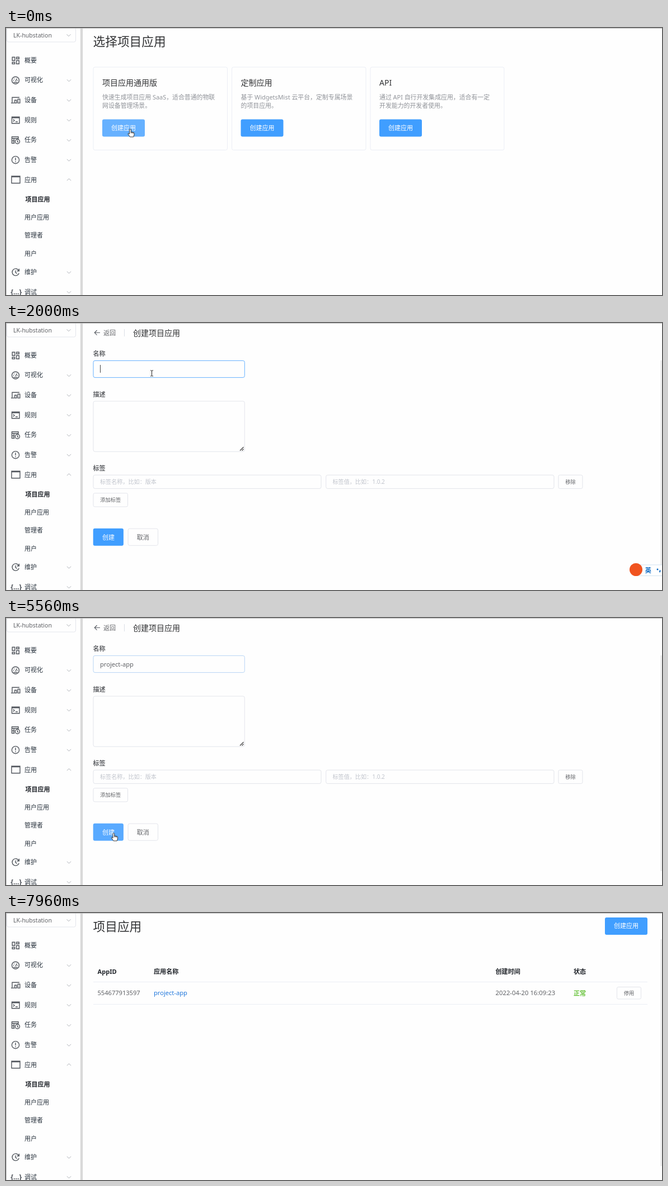
Write an HTML page that moves like this. It is 1172 px wide and 478 px high and loops after 8.11 s.

```html
<!DOCTYPE html>
<html lang="zh-CN">
<head>
<meta charset="utf-8">
<title>项目应用</title>
<style>
  html, body { margin: 0; width: 100%; height: 100%; overflow: hidden; background: #fefefe; }
  svg { display: block; width: 100%; height: 100%; }
  text { font: 11.1px "Noto Sans", "Noto Sans CJK SC", "Noto Sans CJK", sans-serif; fill: #606266; white-space: pre; }
  .h1 { font-size: 21.7px; fill: #303133; }
  .h2 { font-size: 14px; fill: #303133; }
  .menu text { font-size: 11px; fill: #28323d; }
  .bold, .menu .bold { font-weight: 700; }
  .dark, .menu .dark { fill: #1f2329; }
  .note { font-size: 10.9px; fill: #909399; }
  .hint { font-size: 10.1px; fill: #c0c4cc; }
  .small { font-size: 9.3px; text-anchor: middle; }
  .mid { font-size: 11px; text-anchor: middle; }
  .white { fill: #fff; }
  .card { fill: #fefefe; stroke: #ebeef5; }
  .field { fill: #fefefe; stroke: #dcdfe6; stroke-width: .8; }
  .primary { fill: #409eff; }
  .icons { fill: none; stroke: #50555c; stroke-width: 1.4; }
  .chevrons { fill: none; stroke: #a3a7ae; stroke-width: .9; }
  .rule { stroke: #ebeef5; }
</style>
</head>
<body>
<svg viewBox="0 0 1172 478">
  <defs>
    <path id="down" d="M-3.5-1.7 0 1.8 3.5-1.7"/>
    <g id="hand"><path d="M-1.5 8V.8Q-.1-1 1.2.8V5L5.8 6Q7 6.3 7 7.5V10L5.8 14H-.5L-4 8.8Q-4 7-2.6 7.8L-1.5 9ZM1.2 5V7.5M3.2 5.5V7.5M5.2 6V8" fill="#fff" stroke="#222" stroke-width=".9"/></g>
    <g id="arrow"><path d="M0 0V11L2.6 8.6 4.2 12.2 5.8 11.5 4.2 8H7.4Z" fill="#fff" stroke="#222" stroke-width=".9"/></g>
    <g id="beam"><path d="M-2.5-5H-.6L0-4.5.6-5H2.5M0-4.5V4.5M-2.5 5H-.6L0 4.5.6 5H2.5" fill="none" stroke="#222"/></g>
  </defs>

  <rect width="1172" height="478" fill="#fefefe"/>

  <g class="menu">
    <rect class="field" x="1.5" y="-3" width="123" height="28" rx="3"/>
    <text x="13" y="17" style="font-size:10.5px;fill:#606266">LK-hubstation</text>
    <text x="33" y="62.2">概要</text>
    <text x="33" y="97.4">可视化</text>
    <text x="33" y="133.2">设备</text>
    <text x="33" y="168.8">规则</text>
    <text x="33" y="204.4">任务</text>
    <text x="33" y="240.2">告警</text>
    <text x="33" y="275.8">应用</text>
    <text x="34.5" y="310.7" class="bold dark">项目应用</text>
    <text x="33" y="343.2">用户应用</text>
    <text x="33" y="375.4">管理者</text>
    <text x="33" y="408.2">用户</text>
    <text x="33" y="441.2">维护</text>
    <text x="33" y="477.2">调试</text>
    <text x="8.2" y="476.7" class="bold" style="font-size:12.2px;fill:#50555c">{...}</text>
  </g>
  <g class="icons">
    <path d="M11.2 52.2h4.6v6h-4.6zM18.7 52.2h4.6v3h-4.6zM11.2 61.2h4.6v3h-4.6zM18.7 58.2h4.6v6h-4.6z"/>
    <circle cx="17" cy="93.7" r="6.5"/>
    <path d="M17 95.5 19.5 90.5M13 94h1.2M14.3 90.8l.8.8M20 94h1.2M13.5 97.5h7"/>
    <path d="M24 124.2H11V133M9 134.3h5.5M15.6 129.2h3.2v5.2h-3.2zM21.2 127.2h3.6v7.2h-3.6z"/>
    <path d="M10.5 159.2h13.5v11.6H10.5zM10.5 160.7H24M12.8 163.5l2.3 2-2.3 2M17 168h4"/>
    <path d="M15.5 206.2h-5v-11.4h11.5v4M10.5 197.8H22M14.2 198v8M10.5 202h5"/>
    <circle cx="20.5" cy="203.3" r="4"/>
    <path d="M20.5 201v2.7l1.7 1"/>
    <circle cx="17" cy="236.2" r="6.6"/>
    <path d="M17 232.3v4.8M17 238.5v1.7"/>
    <path d="M10 265.2h15v12.6H10zM10 266.6h15"/>
    <path d="M22.8 434.3A6.2 6.2 0 1 0 23.2 439M23.4 431v4h-4M17 434v3.8l2.8 1.6"/>
  </g>
  <g class="chevrons" id="chevrons">
    <use href="#down" x="112" y="13"/>
    <use href="#down" transform="translate(112.5 271.5) scale(1 -1)"/>
  </g>
  <rect x="132.8" width="4.4" height="478" fill="#d9d9d9"/>

  <g id="pick">
    <text class="h1" x="155.5" y="32">选择项目应用</text>
    <rect class="card" x="156" y="70" width="239.5" height="148.5" rx="3"/>
    <rect class="card" x="403.5" y="70" width="239.5" height="148.5" rx="3"/>
    <rect class="card" x="651" y="70" width="239" height="148.5" rx="3"/>
    <text class="h2" x="172" y="103">项目应用通用版</text>
    <text class="h2" x="419.5" y="103">定制应用</text>
    <text class="h2" x="667" y="103">API</text>
    <text class="note" x="172" y="128.4">快速生成项目应用 SaaS，适合普通的物联</text>
    <text class="note" x="172" y="142.8">网设备管理场景。</text>
    <text class="note" x="419.5" y="128.4">基于 WidgetsMist 云平台，定制专属场景</text>
    <text class="note" x="419.5" y="142.8">的项目应用。</text>
    <text class="note" x="667" y="128.4">通过 API 自行开发集成应用，适合有一定</text>
    <text class="note" x="667" y="142.8">开发能力的开发者使用。</text>
    <rect class="primary" id="pickButton" x="172" y="163.5" width="76" height="31" rx="3"/>
    <rect class="primary" x="419.5" y="163.5" width="76" height="31" rx="3"/>
    <rect class="primary" x="667" y="163.5" width="76" height="31" rx="3"/>
    <text class="mid white" x="210" y="183.3">创建应用</text>
    <text class="mid white" x="457.5" y="183.3">创建应用</text>
    <text class="mid white" x="705" y="183.3">创建应用</text>
  </g>

  <g id="form">
    <path d="M168 17.3H158.5M162.5 13 158.2 17.3 162.5 21.6" fill="none" stroke="#50555c" stroke-width="1.1"/>
    <text x="174" y="21.6">返回</text>
    <path d="M211.5 11V24" stroke="#dcdfe6"/>
    <text class="h2" x="227" y="22.8">创建项目应用</text>
    <text class="bold" x="155.5" y="59.2">名称</text>
    <rect class="field" id="nameBox" x="156" y="67.4" width="270.3" height="30.2" rx="3"/>
    <text id="name" x="168" y="87"></text>
    <path id="caret" d="M.5 75V89" stroke="#444"/>
    <text class="bold" x="155.5" y="132.2">描述</text>
    <rect class="field" x="156" y="140" width="270.3" height="90.2" rx="3"/>
    <path d="M418 228.5 424.5 222M421.5 228.5 424.5 225.5" stroke="#444" stroke-width="1.2"/>
    <text class="bold" x="155.5" y="264.2">标签</text>
    <rect class="field" x="156" y="272.2" width="407" height="24.2" rx="3"/>
    <rect class="field" x="571.7" y="272.2" width="407.3" height="24.2" rx="3"/>
    <text class="hint" x="168" y="288.2">标签名称，比如：版本</text>
    <text class="hint" x="583.5" y="288.2">标签值，比如：1.0.2</text>
    <rect class="field" x="987" y="272.2" width="43" height="24.2" rx="2.5"/>
    <text class="small" x="1008.5" y="287.8">移除</text>
    <rect class="field" x="156" y="304.7" width="61.5" height="24.2" rx="2.5"/>
    <text class="small" x="186.8" y="320.3">添加标签</text>
    <rect class="primary" id="createButton" x="155.7" y="367.7" width="54.2" height="31" rx="3"/>
    <text class="mid white" x="183" y="387.6">创建</text>
    <rect class="field" x="218.1" y="368.1" width="53.4" height="30.2" rx="3"/>
    <text class="mid" x="244.8" y="387.6">取消</text>
  </g>

  <g id="list">
    <text class="h1" x="155.5" y="32">项目应用</text>
    <rect class="primary" x="1070" y="8" width="76" height="31" rx="3"/>
    <text class="mid white" x="1108" y="27.4">创建应用</text>
    <g id="table">
      <text class="bold dark" x="163.5" y="108.5">AppID</text>
      <text class="bold dark" x="264" y="108.7">应用名称</text>
      <text class="bold dark" x="874.5" y="108.7">创建时间</text>
      <text class="bold dark" x="1014" y="108.7">状态</text>
      <path class="rule" d="M156 123.5H1146M156 163.5H1146"/>
      <text x="163.5" y="147.3">554677913597</text>
      <text x="264" y="147.3" style="fill:#2479dc">project-app</text>
      <text x="874.5" y="147.3" style="font-size:11.3px">2022-04-20 16:09:23</text>
      <text class="bold" x="1014" y="147.7" style="fill:#67c23a">正常</text>
      <rect class="field" x="1091.5" y="132.5" width="43" height="21.5" rx="2.5"/>
      <text class="small" x="1113" y="147">停用</text>
    </g>
    <path id="toast" d="M434.5 0H728.5V2.5Q728.5 5 726 5H437Q434.5 5 434.5 2.5Z" fill="#ebf5e5"/>
  </g>

  <path id="scrollbar" stroke="#e8e8e8" stroke-width="2"/>
  <g id="ime">
    <rect x="1128" y="433" width="50" height="19.5" fill="#fff" stroke="#d3e4f1"/>
    <circle cx="1125.5" cy="441.5" r="11.5" fill="#f0531f"/>
    <text class="bold" x="1141.8" y="447.2" style="fill:#0a6ac4">英</text>
    <circle cx="1164" cy="441" r="1.5" fill="#0a6ac4"/>
    <path d="M1168.5 442.5v1.6q0 1-1 2" fill="none" stroke="#0a6ac4" stroke-width="2"/>
  </g>
  <path d="M0 .5H1172M.5 0V478" stroke="#bdbdbd"/>
  <use id="cursor"/>
</svg>
<script>
const LOOP = 8110;
const el = id => document.getElementById(id);
const show = (id, on) => { el(id).style.display = on ? '' : 'none'; };

for (const y of [94, 129.5, 165, 201, 236.5, 437.5, 473]) {
  const use = document.createElementNS('http://www.w3.org/2000/svg', 'use');
  use.setAttribute('href', '#down');
  use.setAttribute('x', 112.5);
  use.setAttribute('y', y);
  el('chevrons').append(use);
}

// Each track holds [start time, value...] entries; a value lasts until the next start.
const tracks = {
  scene: [[0, 'pick'], [280, 'form'], [5860, 'list']],
  pickFill: [[0, '#66b1ff'], [130, '#3a8ee6']],
  createFill: [[0, '#409eff'], [5560, '#59aaff'], [5710, '#3a8ee6']],
  border: [[0, '#dcdfe6'], [710, '#c0c4cc'], [850, '#b6bdd2'], [980, '#409eff'], [5560, '#a6cbf3'], [5710, '#c0c4cc']],
  letters: [[0, 0], [2310, 2], [2610, 3], [2890, 4], [3040, 5], [3190, 6], [3480, 7], [3780, 8], [4060, 9], [4210, 10], [4370, 11]],
  caret: [[0, 0], [850, 1], [1410, 0], [2000, 1], [4820, 0]],
  toast: [[0, 0], [6130, .4], [6280, 1], [7400, .5], [7530, 0]],
  cursor: [
    [0, 'hand', 222, 181], [280, 'beam', 226, 180], [410, 'beam', 240, 142], [560, 'beam', 256, 104], [710, 'beam', 260.5, 90],
    [4970, 'beam', 255, 128], [5120, 'beam', 241, 205], [5260, 'beam', 222, 290], [5410, 'arrow', 200, 355],
    [5560, 'hand', 192.5, 385], [5860, 'hand', 192, 383], [5990, 'arrow', 192, 380], [6130, 'arrow', 190, 370],
    [6280, 'arrow', 189, 362], [6560, 'arrow', 216, 350]
  ]
};
const at = (name, t) => tracks[name].findLast(entry => entry[0] <= t).slice(1);

// The pointer leaves through the lower right corner in eight eased steps.
function pointer(t) {
  if (t < 6860) return at('cursor', t);
  const p = (Math.floor((t - 6860) / 135.7) + 1) / 8;
  const ease = p * p * (3 - 2 * p);
  return ['arrow', 216 + 947 * ease, 350 + 125 * ease];
}

function draw(t) {
  const [scene] = at('scene', t);
  for (const id of ['pick', 'form', 'list']) show(id, id === scene);
  show('table', t >= 5990);
  show('ime', t >= 850 && t < 5560);
  show('scrollbar', scene !== 'pick');
  el('scrollbar').setAttribute('d', `M1170.5 ${t < 6860 ? 67 : 47}V453`);
  el('pickButton').style.fill = at('pickFill', t)[0];
  el('createButton').style.fill = at('createFill', t)[0];
  el('nameBox').style.stroke = at('border', t)[0];
  el('toast').style.opacity = at('toast', t)[0];

  const name = el('name');
  name.textContent = 'project-app'.slice(0, at('letters', t)[0]);
  show('caret', at('caret', t)[0]);
  if (scene === 'form') {
    const width = name.textContent ? name.getComputedTextLength() : 0;
    el('caret').setAttribute('transform', `translate(${168 + Math.round(width)} 0)`);
  }

  const [kind, x, y] = pointer(t);
  show('cursor', t < 7960);
  el('cursor').setAttribute('href', '#' + kind);
  el('cursor').setAttribute('transform', `translate(${x} ${y})`);
}

function tick() {
  draw(performance.now() % LOOP);
  requestAnimationFrame(tick);
}
tick();
</script>
</body>
</html>
```
